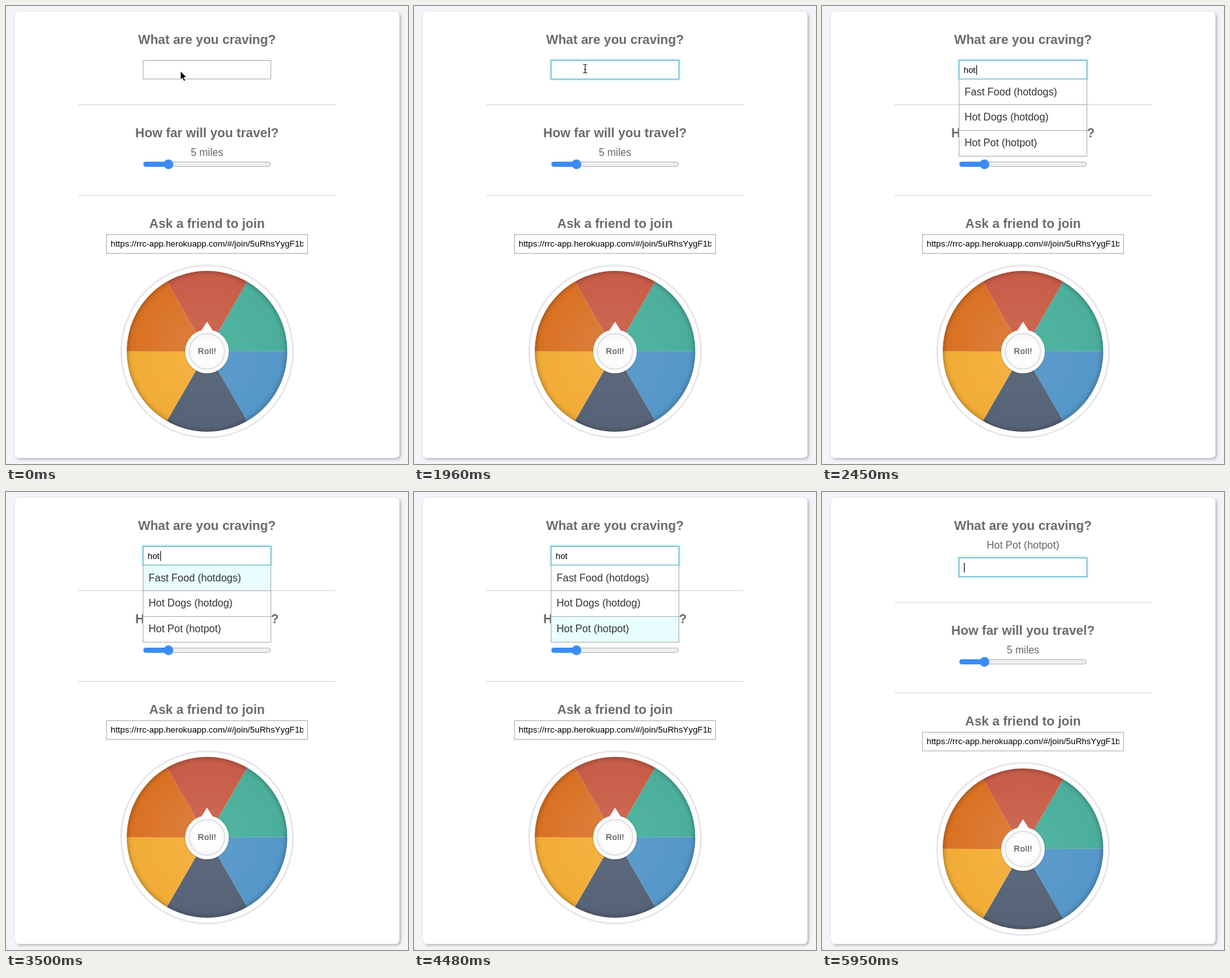
An HTML page for the animation above (6.02 s loop, 626 by 712 pixels).

```html
<!DOCTYPE html>
<html lang="en">
<head>
<meta charset="utf-8">
<title>What are you craving?</title>
<style>
html, body { margin: 0; width: 100%; height: 100%; overflow: hidden; background: #f2f4f8; }
svg { display: block; width: 100%; height: 100%; font: 16px "Liberation Sans", Arial, sans-serif; }
h2, .title { font-weight: bold; font-size: 20px; fill: #6b6b6b; }
.mid { text-anchor: middle; }
.note { fill: #666; }
.field { font-size: 13.333px; fill: #000; }
.box { fill: #fff; stroke: #adadad; }
.rule { stroke: #d3d3d3; }
.item { fill: #333; }
</style>
</head>
<body>
<svg id="stage" viewBox="0 0 626 712">
  <defs>
    <filter id="cardShadow" x="-5%" y="-5%" width="110%" height="110%">
      <feDropShadow dx="2" dy="2" stdDeviation="2.2" flood-color="#000" flood-opacity=".3"/>
    </filter>
    <filter id="hubShadow" x="-30%" y="-30%" width="160%" height="160%">
      <feDropShadow dx="0" dy="0.5" stdDeviation="1.3" flood-color="#000" flood-opacity=".35"/>
    </filter>
    <filter id="glow" x="-10%" y="-40%" width="120%" height="180%">
      <feGaussianBlur stdDeviation="1.5"/>
    </filter>
    <radialGradient id="rim" gradientUnits="userSpaceOnUse" cx="313" cy="537" r="125">
      <stop offset=".93" stop-color="#000" stop-opacity="0"/>
      <stop offset=".965" stop-color="#000" stop-opacity=".06"/>
      <stop offset="1" stop-color="#000" stop-opacity=".2"/>
    </radialGradient>
    <clipPath id="linkClip"><rect x="163" y="356" width="300" height="28"/></clipPath>
  </defs>

  <rect width="626" height="712" fill="#f2f4f8"/>
  <rect x="14" y="9" width="598.5" height="693.5" rx="6" fill="#fff" filter="url(#cardShadow)"/>
  <text class="title mid" x="313" y="59">What are you craving?</text>
  <text id="choice" class="note mid" x="313" y="88">Hot Pot (hotpot)</text>

  <g id="form">
    <path class="rule" d="M113 153.5H513M113 294.5H513"/>
    <text class="title mid" x="313" y="204">How far will you travel?</text>
    <text class="note mid" x="313" y="233">5 miles</text>
    <rect x="214.5" y="242.5" width="197" height="7" rx="3.5" fill="#efefef" stroke="#b5b5b5"/>
    <rect x="214" y="242" width="45" height="8" rx="4" fill="#3c8cf3"/>
    <circle cx="253" cy="246" r="7.6" fill="#3c8cf3"/>

    <text class="title mid" x="313" y="345">Ask a friend to join</text>
    <rect class="box" x="156.5" y="355.5" width="313" height="29"/>
    <text class="field" x="163" y="374" clip-path="url(#linkClip)">https://rrc-app.herokuapp.com/#/join/5uRhsYygF1b</text>

    <circle cx="313" cy="537" r="133.8" fill="#fff" stroke="#e6e6ea" stroke-width="2.6"/>
    <g id="wheel"></g>
    <circle cx="313" cy="537" r="125" fill="url(#rim)"/>
    <g filter="url(#hubShadow)" fill="#fff">
      <path d="M313 491L324 508H302Z"/>
      <circle cx="313" cy="537" r="34"/>
    </g>
    <path d="M313 491L324 508H302Z" fill="#fff"/>
    <circle cx="313" cy="537" r="27.5" fill="#fff" stroke="#dedee0" stroke-width="2"/>
    <circle cx="313" cy="537" r="24" fill="#fdfdfd" stroke="#f0f0f1"/>
    <text class="mid" x="313.2" y="541.3" font-size="13" letter-spacing=".6" fill="#333">Roll!</text>

    <rect class="box" x="213.5" y="84.5" width="199" height="29"/>
    <g id="focus" fill="none">
      <rect x="213" y="84" width="200" height="30" stroke="#8fd9e6" stroke-width="2" filter="url(#glow)"/>
      <rect x="213.5" y="84.5" width="199" height="29" fill="#fff" stroke="#4caabd"/>
    </g>
    <text id="query" class="field" x="220.5" y="104"></text>
    <rect id="caret" y="92" width="1.1" height="15" fill="#000"/>
  </g>

  <g id="list"></g>
  <path id="arrow" d="M271.5 101V114.8L274.7 111.8L277 117L279.4 116L277.2 111H281.5Z" fill="#000" stroke="#fff" stroke-width="1" stroke-linejoin="round"/>
  <path id="beam" d="M263.3 90.5Q266.5 90.5 266.5 92.5Q266.5 90.5 269.7 90.5M266.5 92V102.5M263.3 104Q266.5 104 266.5 102Q266.5 104 269.7 104M264.8 98.5H268.2" fill="none" stroke="#222" stroke-width="1.1"/>
</svg>
<script>
const LOOP = 6020, FOCUS = 420, PICK = 4550;
const $ = id => document.getElementById(id);
const foods = [
  'Butcher|butcher', 'Chimney Cakes|chimneycakes', 'Honey|honey',
  'Juice Bars & Smoothies|juicebars', 'Kombucha|kombucha', 'Cake Shop|cakeshop',
  'Shaved Ice|shavedice', 'Shaved Snow|shavedsnow', 'Smokehouse|smokehouse',
  'Cheese Shops|cheese', 'Chocolatiers & Shops|chocolate',
  'Health Markets|healthmarkets', 'Herbs & Spices|herbsandspices',
  'Meat Shops|meats', 'Pasta Shops|pastashops',
  'Fast Food|hotdogs', 'Hot Dogs|hotdog', 'Hot Pot|hotpot'
];
const typed = [[0, ''], [2100, 'h'], [2310, 'ho'], [2380, 'hot'], [PICK, '']];
const marked = [[0, -1], [3360, 0], [3710, 1], [4200, 2], [PICK, -1]];
// alternating on/off times of the caret
const blinks = [FOCUS, 840, 1050, 1330, 1610, 1960, 2100, 2730, 2940, 3220,
  3360, 3710, 3990, 4200, 4830, 5110, 5390, 5600, 5880];
const caretX = { '': 221, h: 228.3, ho: 235.7, hot: 240.2 };

function add(parent, tag, attrs, text = '') {
  const el = document.createElementNS('http://www.w3.org/2000/svg', tag);
  for (const k in attrs) el.setAttribute(k, attrs[k]);
  el.textContent = text;
  return parent.appendChild(el);
}
const show = (id, on) => $(id).setAttribute('visibility', on ? 'visible' : 'hidden');
const at = (keys, t) => keys.filter(k => k[0] <= t).pop()[1];

function buildWheel() {
  const colors = [['#4fb3a0', '#4bae9b'], ['#5b9bcb', '#5496c8'], ['#5b687b', '#566376'],
    ['#f4b13f', '#f1ac36'], ['#dc7c38', '#d97020'], ['#cc6650', '#c75c47']];
  const rim = i => {
    const a = (i - 1) * Math.PI / 3;
    return `${313 + 125 * Math.cos(a)} ${536.8 + 125 * Math.sin(a)}`;
  };
  colors.forEach(([inner, outer], i) => {
    const g = add(document.querySelector('defs'), 'radialGradient',
      { id: 'slice' + i, gradientUnits: 'userSpaceOnUse', cx: 313, cy: 537, r: 125 });
    add(g, 'stop', { offset: .35, 'stop-color': inner });
    add(g, 'stop', { offset: 1, 'stop-color': outer });
    add($('wheel'), 'path', {
      d: `M313 537L${rim(i)}A125 125 0 0 1 ${rim(i + 1)}Z`, fill: `url(#slice${i})`
    });
  });
}

let listKey;
function drawList(query, mark) {
  if (listKey === query + mark) return;
  listKey = query + mark;
  const list = $('list');
  list.textContent = '';
  if (!query) return;
  foods.filter(f => f.toLowerCase().includes(query)).forEach((food, i) => {
    const [name, tag] = food.split('|');
    const top = 113.5 + 40 * i;
    const line = (text, y) => add(list, 'text', { class: 'item', x: 222, y }, text);
    add(list, 'rect', {
      x: 213.5, y: top, width: 199, height: 40,
      fill: i === mark ? '#e8fdfe' : '#fff', stroke: '#adadad'
    });
    if (name.length + tag.length > 19) {
      line(name, top + 15.5);
      line(`(${tag})`, top + 33.5);
    } else {
      line(`${name} (${tag})`, top + (i ? 24.5 : 25.5));
    }
  });
  add(list, 'path', { d: 'M213 113.5H413', stroke: '#4caabd' });
}

function draw(t) {
  const query = at(typed, t), picked = t >= PICK;
  $('form').setAttribute('transform', `translate(0 ${picked ? 18 : 0})`);
  $('focus').setAttribute('opacity', Math.max(0, Math.min(1, (t - FOCUS + 70) / 210)));
  $('query').textContent = query;
  $('caret').setAttribute('x', caretX[query]);
  show('caret', blinks.filter(b => b <= t).length % 2);
  show('choice', picked);
  show('arrow', t < 70);
  show('beam', t >= 70 && t < 2100);
  drawList(query, at(marked, t));
}

buildWheel();
const start = performance.now();
function tick() {
  draw((performance.now() - start) % LOOP);
  requestAnimationFrame(tick);
}
tick();
</script>
</body>
</html>
```
